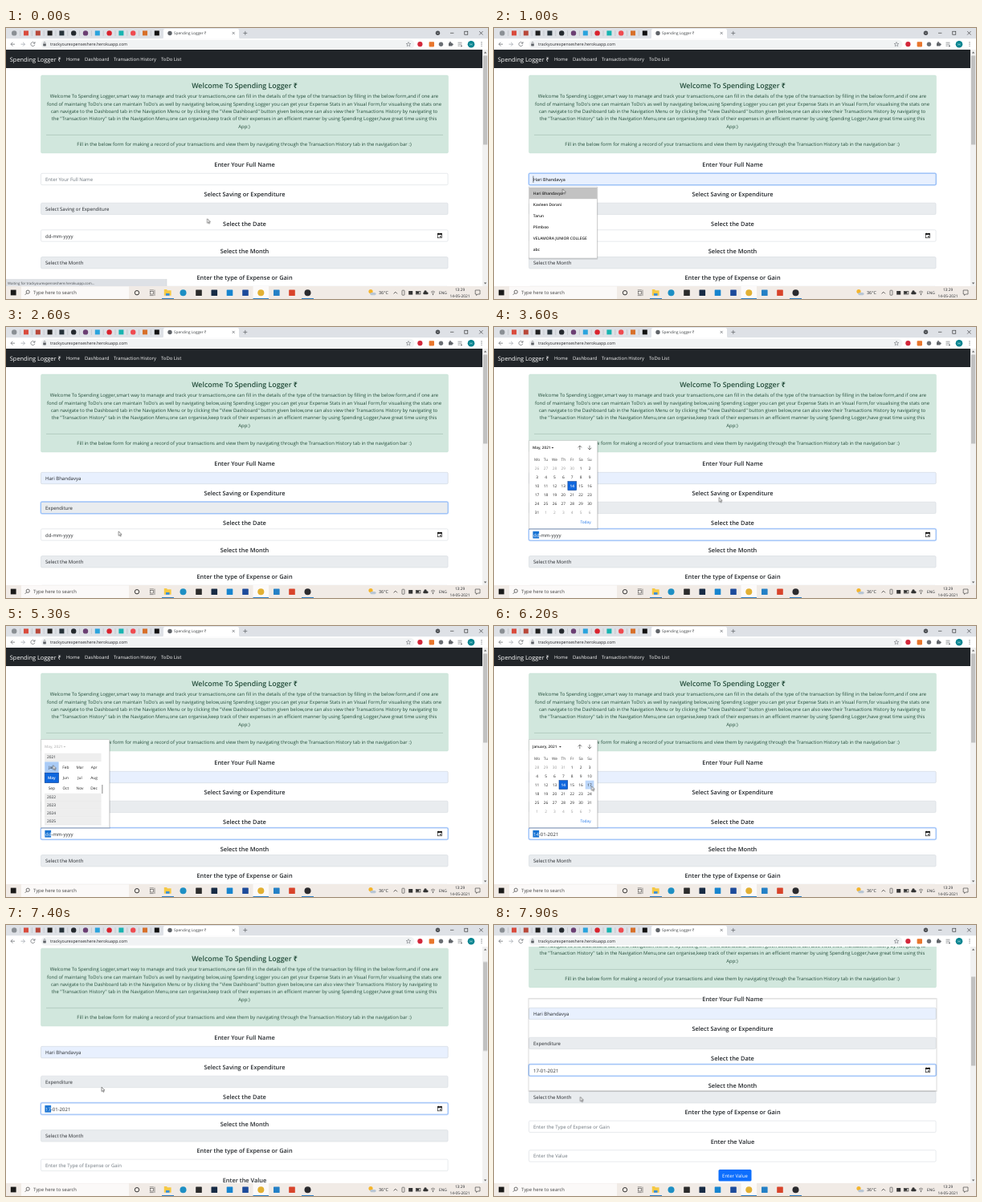
Animation, 600 px wide and 338 px high, one loop 8 s. Source, as an HTML page:

```html
<!DOCTYPE html>
<html lang="en">
<head>
<meta charset="utf-8">
<title>Spending Logger</title>
<style>
  html, body { margin: 0; width: 100%; height: 100%; overflow: hidden; background: #fff; }
  svg { display: block; }
  body > svg { width: 100vw; height: 100vh; }
  text { font-family: "Open Sans", "Noto Sans", sans-serif; fill: #212529; text-rendering: geometricPrecision; white-space: pre; }
</style>
</head>
<body>
<script>
const LOOP = 8000, NAME = 'Hari Bhandavya', APP = 'Spending Logger';
let css = '', count = 0;

// ---- drawing helpers (text is placed by its vertical centre) ----
const rect = (x, y, w, h, fill, more = '') => `<rect x="${x}" y="${y}" width="${w}" height="${h}" fill="${fill}" ${more}/>`;
const dot = (x, y, r, fill, more = '') => `<circle cx="${x}" cy="${y}" r="${r}" fill="${fill}" ${more}/>`;
const line = (d, color = '#5f6368', w = .7, more = '') => `<path d="${d}" fill="none" stroke="${color}" stroke-width="${w}" ${more}/>`;
const text = (x, y, str, size = 6, fill = '#212529', more = '') =>
  `<text x="${x}" y="${y + size * .36}" font-size="${size}" style="fill:${fill}" ${more}>${str}</text>`;
const mid = (x, y, str, size, fill, more = '') => text(x, y, str, size, fill, `text-anchor="middle" ${more}`);
const bold = 'font-weight="600"';

// ---- timing helpers ----
const pct = ms => ms / LOOP * 100 + '%';
const frames = (steps, easing) => {
  const id = 'k' + count++;
  css += `@keyframes ${id}{${steps.map(([ms, rule]) => `${pct(ms)}{${rule}}`).join('')}}`;
  return `style="animation:${id} ${LOOP}ms ${easing} infinite"`;
};
const during = (from, to, art) =>
  `<g ${frames([[0, 'opacity:0'], [from, 'opacity:1'], [to, 'opacity:0']], 'step-end')}>${art}</g>`;
const slide = (points, easing, art) =>
  `<g ${frames(points.map(([ms, x, y]) => [ms, `transform:translate(${x}px,${y}px)`]), easing)}>${art}</g>`;

// ---- form parts ----
const label = (y, str) => mid(297, y, str, 7.4, '#212529', bold);
const box = (y, fill = '#fff', h = 14.4) => rect(43.5, y, 506.6, h, fill, 'rx="1.5" stroke="#ced4da" stroke-width=".5"');
const ring = (y, h = 14.4) =>
  rect(43.1, y - .4, 507.4, h + .8, 'none', 'rx="2" stroke="#0d6efd" stroke-opacity=".24" stroke-width="1.5"') +
  rect(43.5, y, 506.6, h, 'none', 'rx="1.5" stroke="#86b7fe" stroke-width=".6"');
const popup = (x, y, w, h, fill = '#fff') =>
  rect(x - .5, y + .3, w + 1.6, h + 1.4, '#000', 'opacity=".13" rx="1"') +
  rect(x, y, w, h, fill, 'stroke="#b4b4b4" stroke-width=".4"');

const GREEN = '#234c3a';
const intro = [
  `Welcome To ${APP},smart way to manage and track your transactions,one can fill in the details of the type of the transaction by filling in the below form,and if one are`,
  `fond of maintaing ToDo's one can maintain ToDo's as well by navigating below,using ${APP} you can get your Expense Stats in an Visual Form,for visualising the stats one`,
  'can navigate to the Dashboard tab in the Navigation Menu or by clicking the "View Dashboard" button given below,one can also view their Transactions History by navigating to',
  `the "Transaction History" tab in the Navigation Menu,one can organise,keep track of their expenses in an efficient manner by using ${APP},have great time using this`,
  'App:)'
];

const banner =
  rect(43.5, 59, 507, 97, '#d1e7dd', 'rx="1.6" stroke="#badbcc" stroke-width=".4"') +
  mid(297, 71.8, `Welcome To ${APP} ₹`, 8.85, GREEN, bold) +
  intro.map((str, i) => mid(296.5, 85 + i * 9.38, str, 5.93, GREEN)).join('') +
  line('M50 133.4H544', GREEN, .5, 'opacity=".35"') +
  mid(296.5, 145.2, 'Fill in the below form for making a record of your transactions and view them by navigating through the Transaction History tab in the navigation bar :)', 5.97, GREEN);

const navbar = rect(0, 27, 593, 23, '#212529') +
  text(4.8, 39.3, APP + ' ₹', 7.4, '#fff') +
  [[75, 'Home'], [98, 'Dashboard'], [134, 'Transaction History'], [193, 'ToDo List']]
    .map(([x, str]) => text(x, 39.3, str, 5.9, '#f6f6f6')).join('');

const dateValue = (from, to, str) => during(from, to, text(49, 259.4, str));
const picked = (from, to, str) => during(from, to,
  rect(48.4, 254.8, 7.7, 8.8, '#1873d3') + text(49, 259.4, str, 6, '#fff'));

const form =
  label(170.4, 'Enter Your Full Name') +
  box(181.3) +
  during(0, 900, text(49, 188.8, 'Enter Your Full Name', 6, '#6c757d')) +
  during(900, 8000, box(181.3, '#e8f0fe')) +
  during(900, 1200, text(49, 188.8, NAME, 5.4, '#000', 'style="font-family:\'Liberation Sans\',sans-serif"')
    + line('M48.9 184.5V193', '#000', .5)) +
  during(1200, 8000, text(49, 188.8, NAME)) +
  during(600, 1500, ring(181.3)) +

  label(207.4, 'Select Saving or Expenditure') +
  box(218.2, '#e9ecef') +
  during(0, 2500, text(49, 225.6, 'Select Saving or Expenditure')) +
  during(2500, 8000, text(49, 225.6, 'Expenditure')) +
  during(1500, 2900, ring(218.2)) +

  label(244.3, 'Select the Date') +
  box(251.8) +
  dateValue(0, 5500, 'dd-mm-yyyy') + dateValue(5500, 6500, '14-01-2021') + dateValue(6500, 8000, '17-01-2021') +
  picked(3200, 5500, 'dd') + picked(5500, 6500, '14') + picked(6500, 7750, '17') +
  rect(537.4, 256.6, 5, 5.2, 'none', 'stroke="#000" stroke-width=".6"') +
  rect(537.1, 256.2, 5.6, 1.6, '#000') + line('M538.3 255.6v1.2M541.5 255.6v1.2', '#000', .7) + rect(540, 259.4, 1.4, 1.4, '#000') +
  during(3000, 8000, ring(251.8)) +

  label(277.9, 'Select the Month') +
  box(285.6, '#e9ecef') + text(49, 293, 'Select the Month') +
  label(311.5, 'Enter the type of Expense or Gain') +
  box(322.2) + text(49, 329.6, 'Enter the Type of Expense or Gain', 6, '#6c757d') +
  label(348, 'Enter the Value') +
  box(358.8) + text(49, 366.2, 'Enter the Value', 6, '#6c757d') +
  rect(279.5, 383, 41, 14.6, '#0d6efd', 'rx="1.6"') + mid(300, 390.6, 'Enter Value', 6, '#fff');

const page = `<svg x="0" y="27" width="600" height="295" viewBox="0 27 600 295">` +
  rect(0, 27, 600, 295, '#fff') +
  slide([[0, 0, 0], [7250, 0, 0], [7600, 0, -78], [8000, 0, -78]], 'ease-in-out', navbar + banner + form) +
  rect(593, 27, 7, 295, '#f1f1f1') +
  slide([[0, 0, 0], [7250, 0, 0], [7600, 0, 30], [8000, 0, 30]], 'ease-in-out', rect(594, 34.5, 5.2, 111, '#c1c1c1')) +
  '<path d="M594.9 31.6l1.7-2 1.7 2zM594.9 317.4l1.7 2 1.7-2z" fill="#606060"/></svg>';

// ---- browser frame ----
const pins = ['#8a8f94', '#d94b3d', '#b8483a', '#1f1f1f', '#26323a', '#24292e', '#6b3f73', '#2aa3dd', '#d9232e', '#17b3b0', '#ef4a50', '#d8702a', '#111'];
const frame =
  rect(0, 0, 600, 13.4, '#dee1e6') +
  pins.map((c, i) => {
    const x = 10.2 + i * 14.8;
    return ([0, 5, 6, 8, 10].includes(i) ? dot(x, 6.4, 3.2, c) : rect(x - 3, 3.4, 6, 6, c)) +
      (i < 12 ? line(`M${x + 7.4} 3.2v6.8`, '#a4a8ad', .4) : '');
  }).join('') +
  '<path d="M194 13.5q2 0 2-2V3q0-2 2-2H288q2 0 2 2v8.5q0 2 2 2z" fill="#fff"/>' +
  dot(204, 6.5, 2.7, '#5f6368') +
  text(209, 6.6, APP + ' ₹', 4.7, '#3c4043') +
  line('M281.7 4.9l3 3m0-3l-3 3M295.3 6.4h5M297.8 3.9v5') +
  dot(537.5, 6.2, 2.7, '#4a4d51') + line('M536.3 5.7l1.2 1.2 1.2-1.2', '#fff', .5) +
  line('M553 6.3h4.4M589.2 4.1l4.4 4.4m0-4.4l-4.4 4.4', '#222', .6) + rect(570.8, 4.2, 4, 4, 'none', 'stroke="#222" stroke-width=".6"') +
  rect(0, 13.4, 600, 13.6, '#fff') +
  line('M11 20.2H6m2.4-2.4L6 20.2l2.4 2.4') +
  line('M18.5 20.2h5m-2.4-2.4l2.4 2.4-2.4 2.4', '#9aa0a6') +
  line('M35.5 18.8a2.5 2.5 0 1 0 .3 2M36 17.2v2h-2') +
  rect(43.5, 14.8, 465, 10.8, '#f1f3f4', 'rx="5.4"') +
  rect(46.2, 19.4, 3.6, 3, '#5f6368', 'rx=".4"') + line('M47 19.4v-1a1 1 0 0 1 2 0v1', '#5f6368', .5) +
  text(55, 20.2, 'trackyourexpenseshere.herokuapp.com', 5.2, '#202124') +
  line('M501 17.5l.8 1.9 2 .1-1.6 1.3.6 2-1.8-1.1-1.8 1.1.6-2-1.6-1.3 2-.1z', '#5f6368', .5) +
  dot(515.4, 20.2, 3.1, '#d3273a') +
  rect(526.6, 17.2, 6.4, 6.2, '#e8762c', 'rx=".8"') +
  dot(541.5, 20.2, 2.7, '#6b6f74') +
  rect(551, 18.4, 4.6, 4.2, '#5f6368', 'rx=".6"') + dot(553, 18, 1, '#5f6368') + dot(555.8, 20.4, 1, '#5f6368') +
  line('M562.5 18.2h5M562.5 20.2h5M562.5 22.2h2.6', '#5f6368', .6) + '<path d="M566 21.2l2.4 1.2-2.4 1.2z" fill="#5f6368"/>' +
  dot(579, 20.2, 4.3, '#00838f') + mid(579, 20.2, 'H', 4.6, '#fff') +
  [17.9, 20.2, 22.5].map(y => dot(592, y, .6, '#5f6368')).join('');

const status = during(0, 400,
  rect(0, 313.7, 200, 8.6, '#dee1e6', 'stroke="#c3c6ca" stroke-width=".4"') +
  text(2, 318, 'Waiting for trackyourexpenseshere.herokuapp.com...', 4.4, '#4a4e52'));

// ---- taskbar ----
const apps = [[220.5, '#1d8fc4', 1], [240, '#2b2b2b'], [259.3, '#172b45'], [278.5, '#1684cf'], [298, '#1d4b9b'],
  [317.3, '#e2b032', 1], [336.8, '#2480c6'], [356, '#d8432a'], [375.5, '#2a2a2e', 1]];
const taskbar =
  rect(0, 322, 600, 16, '#f1ebe6') +
  rect(5.8, 326.6, 6.8, 6.8, '#1a1a1a') +
  rect(19, 322.4, 134, 15.6, '#fbf9f8') +
  dot(27.2, 329.2, 2.1, 'none', 'stroke="#333" stroke-width=".7"') + line('M25.7 330.8l-2 2', '#333') +
  text(34, 330.2, 'Type here to search', 5.9, '#444') +
  dot(163, 330.2, 2.7, 'none', 'stroke="#222" stroke-width=".9"') +
  rect(179.6, 328.4, 3.8, 3.6, 'none', 'stroke="#333" stroke-width=".5"') + line('M178.8 326.8h5M178.8 333.6h5M185 326.6v7.4', '#333', .5) +
  rect(307.5, 322, 19.5, 16, '#fcfaf9') +
  '<path d="M196.8 326h3.2l1 1.2h4.6v6.6h-8.8z" fill="#f6c945"/>' + rect(199, 331, 4.5, 2.8, '#3a8fd8') +
  apps.map(([x, c, round]) => round ? dot(x, 330.2, 4, c) : rect(x - 3.8, 326.4, 7.6, 7.6, c, 'rx=".6"')).join('') +
  [[194, 15], [307.5, 19.5], [368, 15]].map(([x, w]) => rect(x, 337, w, 1, '#2f7fc4')).join('') +
  dot(454, 328.6, 2.6, '#f4b52c') + rect(453.2, 330, 7.4, 3.2, '#b9c6d4', 'rx="1.6"') +
  text(464, 330.2, '36°C', 5.4) +
  line('M482.6 331.4l2.2-2.2 2.2 2.2', '#222') +
  rect(493, 327.2, 3, 6, 'none', 'rx=".6" stroke="#333" stroke-width=".6"') +
  rect(501.2, 328, 5, 4.6, '#333') +
  rect(510.3, 328.4, 5.6, 3.6, 'none', 'stroke="#333" stroke-width=".7"') + rect(510.6, 328.8, 3.6, 2.8, '#333') +
  rect(519.2, 329.2, 6.4, 3, '#333', 'rx="1.5"') + dot(522, 329, 1.7, '#333') +
  line('M529 329.4q2.5-2.4 5 0M530 331q1.5-1.4 3 0', '#333', .6) + dot(531.5, 332.4, .6, '#333') +
  text(539, 330.2, 'ENG', 4.8) +
  mid(565, 326.4, '13:29', 4.8) + mid(565, 333.8, '14-05-2021', 4.8) +
  line('M584.2 327h5.8v5h-3l-1.4 1.5v-1.5h-1.4z', '#333', .6);

// ---- popups ----
const people = [NAME, 'Kavleen Dorani', 'Tarun', 'Plimboo', 'VELAMORA JUNIOR COLLEGE', 'abc'];
const suggestions = during(700, 1200,
  popup(43.6, 198, 84.6, 89) +
  during(900, 1200, rect(43.8, 199, 84.2, 14.2, '#c2c2c2')) +
  people.map((str, i) => text(48.8, 206.2 + i * 14.05, str, 4.85, '#222', bold)).join(''));

const kinds = ['Select Saving or Expenditure', 'Saving', 'Expenditure'];
const hot = [[1600, 1800], [1800, 2200], [2200, 2500]];
const options = during(1600, 2500,
  popup(43.6, 233.4, 506.6, 26, '#e9ecef') +
  rect(43.6, 233.4, 506.6, 26, 'none', 'stroke="#6b6b6b" stroke-width=".5"') +
  kinds.map((str, i) => {
    const y = 237.7 + i * 8.6;
    return text(48.8, y, str) +
      during(...hot[i], rect(43.9, y - 4.3, 506, 8.6, '#1e90ff') + text(48.8, y, str, 6, '#fff'));
  }).join(''));

const BLUE = '#0f67de';
const title = (str, color) => text(48, 150.6, str, 4.7, color, bold);
const caret = (x, color) => `<path d="M${x} 149.9h2.8l-1.4 1.6z" fill="${color}"/>`;
const month = (name, caretX, lead, before, length, chosen, hover) => {
  let out = title(name, '#222') + caret(caretX, '#222') +
    line('M106.8 153.2v-5.2m-2.3 2.3l2.3-2.3 2.3 2.3M119 147.8v5.2m-2.3-2.3l2.3 2.3 2.3-2.3', '#333', .6) +
    mid(114, 243, 'Today', 4.8, '#1a73e8');
  ['Mo', 'Tu', 'We', 'Th', 'Fr', 'Sa', 'Su'].forEach((d, i) => out += mid(53.6 + i * 10.9, 165.3, d, 4.8, '#444'));
  for (let i = 0; i < 42; i++) {
    const x = 53.6 + i % 7 * 10.9, y = 176.2 + Math.floor(i / 7) * 10.95, n = i - lead + 1;
    const inside = n > 0 && n <= length, on = n === chosen;
    const day = n < 1 ? before + n : n > length ? n - length : n;
    if (on) out += rect(x - 5.3, y - 5.4, 10.7, 10.8, BLUE, 'stroke="#0a3f8f" stroke-width=".6"');
    if (n === hover) out += during(5950, 6500, rect(x - 5.3, y - 5.4, 10.7, 10.8, '#bcd7fa'));
    out += mid(x, y, day, 4.8, on ? '#fff' : inside ? '#222' : '#9a9a9a', on ? bold : '');
  }
  return out;
};

const yearRow = (y, n) => rect(48, y - 4.9, 70.5, 9.8, '#eee') + line(`M48 ${y + 4.9}h70.5`, '#d8d8d8', .4) + text(51, y, n, 4.8);
const names = 'Jan Feb Mar Apr May Jun Jul Aug Sep Oct Nov Dec'.split(' ');
const monthList = title('May, 2021', '#bdbdbd') + caret(71.5, '#bdbdbd') + yearRow(163.6, 2021) +
  during(4900, 5500, rect(48.2, 169.4, 17.4, 12.8, '#a9cbf6')) +
  rect(48.2, 183, 17.4, 12.6, BLUE, 'stroke="#0a3f8f" stroke-width=".6"') +
  names.map((m, i) => mid(56.8 + i % 4 * 17.6, 176 + Math.floor(i / 4) * 13.2, m, 4.8, i === 4 ? '#fff' : '#222', i === 4 ? bold : '')).join('') +
  [2022, 2023, 2024, 2025].map((n, i) => yearRow(213.6 + i * 9.85, n)).join('') +
  rect(119, 198, 1.6, 11, '#b5b5b5');

const calendar = during(3200, 6500,
  popup(43.6, 141.8, 85.2, 109.4) +
  during(3200, 4400, month('May, 2021', 71.5, 5, 30, 31, 14)) +
  during(4400, 5500, monthList) +
  during(5500, 6500, month('January, 2021', 81, 4, 31, 31, 14, 17)));

// The month list pops up above its field, still unpainted: only its soft shadow shows.
const emptyList = during(7800, 8000,
  rect(43, 91.8, 508, 115.6, 'none', 'stroke="#000" stroke-opacity=".1" stroke-width="1.4"') +
  line('M43.5 92H550.5', '#c9c9c9', .4) + line('M43.5 207H550.5', '#aaa', .7));

const pointer = slide([
  [0, 250.5, 237.8], [150, 250.5, 237.8], [550, 92, 190], [700, 90, 190], [950, 85.5, 200.8], [1200, 85.5, 200.8],
  [1450, 96, 226], [1600, 97, 227], [1850, 103.8, 248.8], [2100, 103.8, 249], [2250, 104, 254], [2500, 104, 254.5],
  [3000, 538, 258], [3250, 539, 258], [3600, 280.2, 212.6], [4100, 66, 150], [4450, 62, 150], [4950, 58.5, 173.6],
  [5500, 58.5, 173.6], [5950, 121.4, 199.6], [7300, 121.4, 199.6], [7650, 107.4, 214.4], [8000, 107.4, 214.4]
], 'ease-in-out', '<path d="M0 0v5.5l1.3-1.2.9 2 .9-.4-.9-1.9h1.8z" fill="#fff" stroke="#222" stroke-width=".5"/>');

const art = page + frame + status + suggestions + options + calendar + emptyList + taskbar + pointer;
document.head.insertAdjacentHTML('beforeend', `<style>${css}</style>`);
document.body.insertAdjacentHTML('beforeend', `<svg viewBox="0 0 600 338" preserveAspectRatio="none">${art}</svg>`);
</script>
</body>
</html>
```
